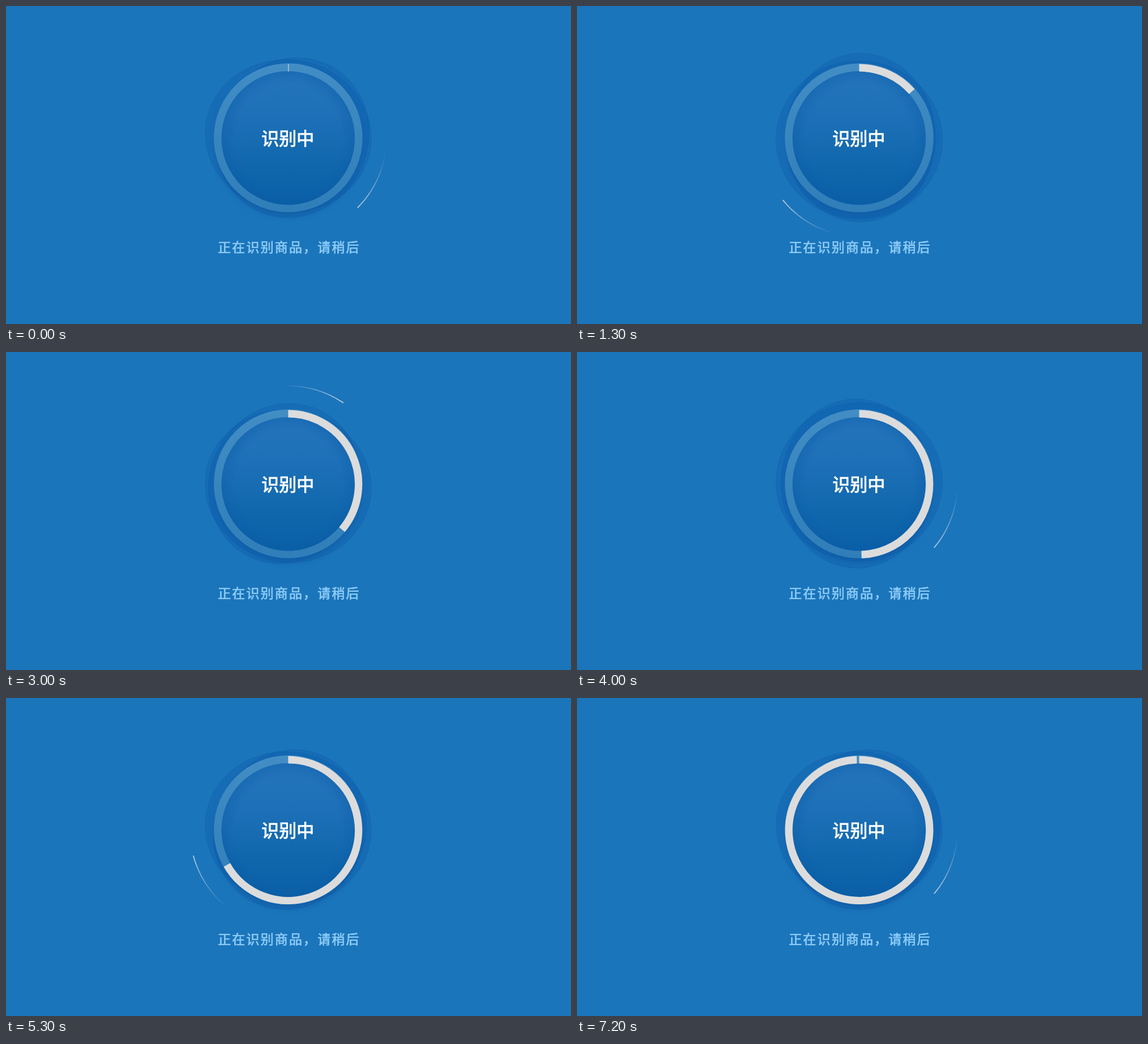
Write an HTML page that moves like this. It is 998 px wide and 561 px high and loops after 7300 ms.

```html
<!DOCTYPE html>
<html lang="zh-CN">
<head>
<meta charset="utf-8">
<title>识别中</title>
<style>
  html, body { margin: 0; width: 100%; height: 100%; overflow: hidden; background: #1b75bb; }
  svg { display: block; width: 100%; height: 100%; }
  text { font-family: "Noto Sans CJK SC", "Noto Sans CJK", "Noto Sans", sans-serif; }
  .blob { fill: #0b55a6; fill-opacity: .26; stroke: #0a4f9a; stroke-opacity: .22; stroke-width: 1; }
</style>
</head>
<body>
<svg viewBox="0 0 998 561">
  <defs>
    <linearGradient id="face" x1="0" y1="0" x2="0" y2="1">
      <stop offset="0" stop-color="#2475bb"/>
      <stop offset=".35" stop-color="#1d70b7"/>
      <stop offset=".75" stop-color="#0f66ab"/>
      <stop offset="1" stop-color="#0a60a6"/>
    </linearGradient>
    <radialGradient id="rim">
      <stop offset=".8" stop-color="#0a5aa8" stop-opacity="0"/>
      <stop offset="1" stop-color="#0a5aa8" stop-opacity=".35"/>
    </radialGradient>
    <linearGradient id="band" x1="0" y1="0" x2="0" y2="1">
      <stop offset="0" stop-color="#428dc4"/>
      <stop offset="1" stop-color="#307eb9"/>
    </linearGradient>
    <filter id="soft" x="-20%" y="-20%" width="140%" height="140%"><feGaussianBlur stdDeviation="6"/></filter>
    <clipPath id="above"><rect width="998" height="398"/></clipPath>
  </defs>
  <rect width="998" height="561" fill="#1b75bb"/>
  <circle cx="498.5" cy="242" r="129" fill="#0a4f93" opacity=".45" filter="url(#soft)"/>
  <ellipse id="wide" class="blob"/>
  <ellipse id="tall" class="blob"/>
  <circle cx="498.4" cy="232.5" r="131.3" fill="url(#band)"/>
  <circle cx="498.4" cy="232.9" r="117.8" fill="url(#face)"/>
  <circle cx="498.4" cy="232.9" r="117.8" fill="url(#rim)"/>
  <path id="progress" fill="none" stroke="#dcdcdc" stroke-width="13.2"/>
  <g clip-path="url(#above)"><g id="comet" fill="none" stroke="#e0e4e8"></g></g>
  <text x="451.2" y="245.3" font-size="31" fill="#fff" stroke="#fff" stroke-width="1">识别中</text>
  <text x="374.2" y="434" font-size="23" letter-spacing="2.15" fill="#8fcdf8" stroke="#8fcdf8" stroke-width=".65">正在识别商品，请稍后</text>
</svg>
<script>
const LOOP = 7300, STEP = 100, UNITS = 150;
const CX = 498.4, CY = 233.2;
const RING = 124.3, ORBIT = 173.4, TAIL = 37, PARTS = 28;

const $ = id => document.getElementById(id);

function point(r, deg) {
  const a = deg * Math.PI / 180;
  return (CX + r * Math.cos(a)).toFixed(2) + " " + (CY + r * Math.sin(a)).toFixed(2);
}

function arc(r, from, to) {
  const large = to - from > 180 ? 1 : 0;
  return `M${point(r, from)}A${r} ${r} 0 ${large} 1 ${point(r, to)}`;
}

// The tail fades and thins away from its leading end
for (let i = 0; i < PARTS; i++) {
  const k = (i + 1) / PARTS;
  const part = document.createElementNS("http://www.w3.org/2000/svg", "path");
  part.setAttribute("d", arc(ORBIT, TAIL * (i / PARTS - 1), TAIL * (k - 1)));
  part.setAttribute("stroke-width", 1 + .7 * k);
  part.setAttribute("stroke-opacity", k * .85);
  $("comet").appendChild(part);
}

// Slow start, steady middle, quick finish
function pace(step) {
  return step + Math.max(0, step - 6) + 1.375 * Math.max(0, step - 64);
}

function setBlob(id, cx, cy, rx, ry, tilt) {
  const attrs = { cx, cy, rx, ry, transform: `rotate(${tilt} ${cx} ${cy})` };
  for (const name in attrs) $(id).setAttribute(name, attrs[name]);
}

function draw(ms) {
  const unit = pace(Math.floor((ms % LOOP) / STEP));
  const turn = unit / UNITS;
  const u = turn * 2 * Math.PI;
  const sway = Math.cos(3 * u);

  setBlob("wide", 498.5, 232 + 5 * Math.sin(u) - 3 * Math.cos(2 * u),
    147, 137 - 3 * sway, 5 + 5 * sway);
  setBlob("tall", 500 + 8 * Math.cos(u + .66), 232,
    132.5, 146 - 3 * sway, 13 + 15 * sway);

  $("progress").setAttribute("d", arc(RING, -90, -89.5 + turn * 360));
  $("comet").setAttribute("transform", `rotate(${45 + turn * 720} ${CX} ${CY})`);
}

const start = performance.now();
function tick() {
  draw(performance.now() - start);
  requestAnimationFrame(tick);
}
draw(0);
requestAnimationFrame(tick);
</script>
</body>
</html>
```
